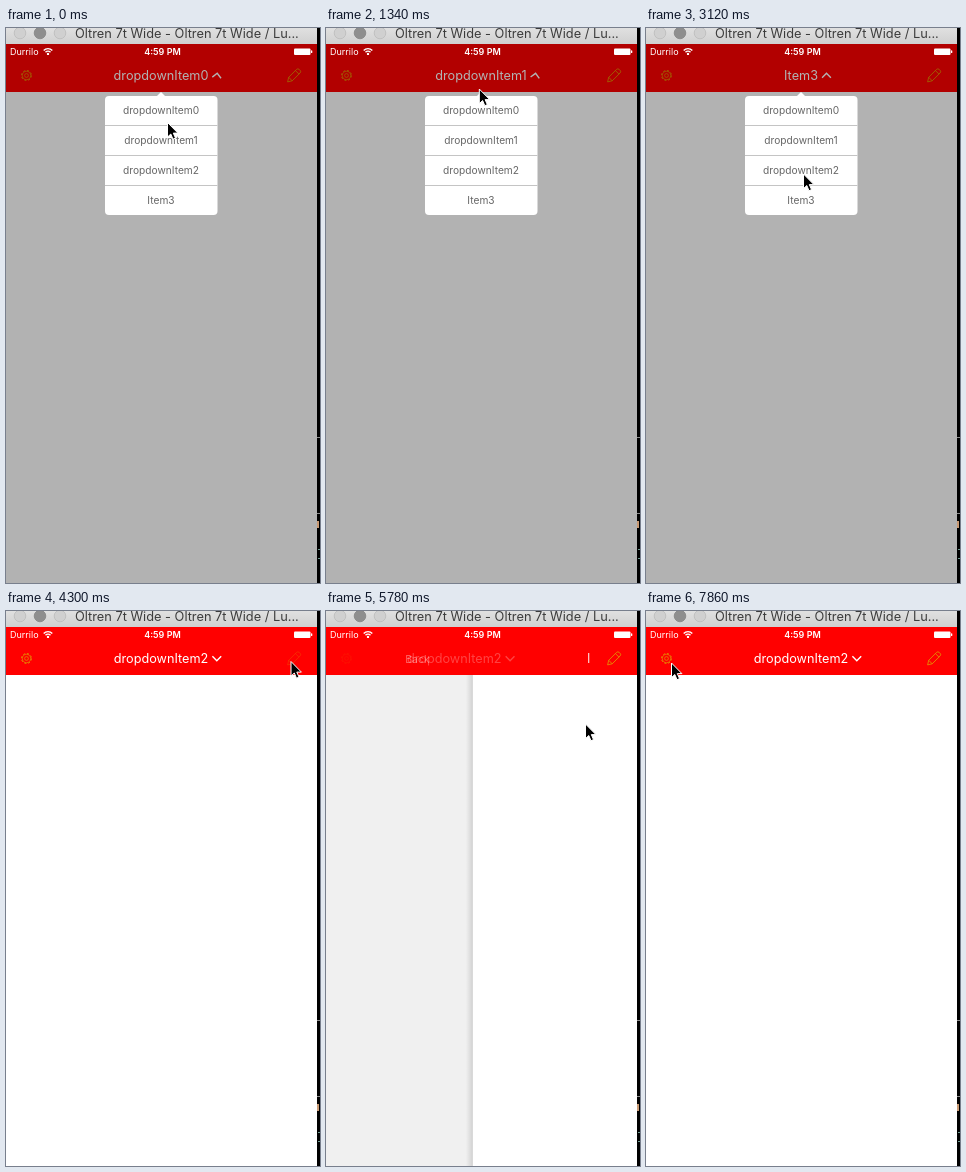
An HTML page that plays this animation: 314x555 px, repeating every 8000 ms.

```html
<!DOCTYPE html>
<html lang="en">
<head>
<meta charset="utf-8">
<title>Dropdown menu</title>
<style>
  html, body { margin: 0; width: 100%; height: 100%; overflow: hidden; background: #000; }
  svg { display: block; width: 314px; height: 555px; }
  text { font-family: Inter, Roboto, sans-serif; }
  .mid { text-anchor: middle; }
  .bar { font-size: 12.7px; fill: #fff; }
  .status { font-size: 9px; fill: #fff; }
  .item { font-size: 10.2px; fill: #666; }
  .icon { fill: none; stroke: #dfa800; stroke-width: .7; }
  .line { fill: none; stroke: #fff; stroke-width: 1.4; }
</style>
</head>
<body>
<svg viewBox="0 0 314 555">
  <defs>
    <linearGradient id="chrome" x2="0" y2="1">
      <stop stop-color="#e0e0e0"/><stop offset="1" stop-color="#d0d0d0"/>
    </linearGradient>
    <linearGradient id="shade">
      <stop stop-opacity="0"/><stop offset="1" stop-opacity=".13"/>
    </linearGradient>
    <clipPath id="screen"><rect y="16" width="311" height="539"/></clipPath>
    <clipPath id="reveal"><rect id="window" x="90" y="64" width="130"/></clipPath>
  </defs>

  <rect width="314" height="555"/>
  <path d="M311 409.5h3M311 485.5h3" stroke="#8a8a8a"/>
  <path d="M312 521.5h2M312 530.5h2" stroke="#6f9a90"/>
  <rect x="311" y="493" width="2" height="7" fill="#c99a74"/>

  <rect width="311" height="16" fill="url(#chrome)"/>
  <g stroke="#bcbcbc" fill="#d0d0d0" stroke-width=".8">
    <circle cx="14" cy="5" r="5.8"/>
    <circle cx="34" cy="5" r="5.8" fill="#8e8e8e" stroke="#858585"/>
    <circle cx="54" cy="5" r="5.8"/>
  </g>
  <text x="69" y="10" font-size="12.8" fill="#3c3c3c">Oltren 7t Wide - Oltren 7t Wide / Lu...</text>

  <g clip-path="url(#screen)">
    <rect y="16" width="311" height="539" fill="#fff"/>
    <rect id="under" y="64" width="311" height="491"/>
    <g id="page">
      <rect x="-7" y="64" width="7" height="491" fill="url(#shade)"/>
      <rect y="64" width="312" height="491" fill="#fff"/>
    </g>

    <rect y="16" width="311" height="48" fill="#f00"/>
    <g id="gear" class="icon">
      <circle cx="20.5" cy="47.5" r="5" stroke-width=".8" stroke-dasharray="2 1.927"/>
      <circle cx="20.5" cy="47.5" r="4.2" stroke-width=".6"/>
      <circle cx="20.5" cy="47.5" r="1.9" stroke-width=".6"/>
    </g>
    <path id="pencil" class="icon" transform="translate(288 47.5) rotate(-45)"
      d="M-9 0L-5-2.5H6a2 2 0 0 1 2 2v1a2 2 0 0 1-2 2H-5ZM-5-2.5V2.5M4.5-2.5V2.5"/>
    <g id="heading">
      <text id="label" class="bar mid" x="155" y="52"></text>
      <path id="caret" class="line" d="M-4.4 2.2L0-2.2L4.4 2.2"/>
    </g>
    <text id="next" class="bar mid" y="52">I</text>
    <text id="back" class="mid" y="52" font-size="10.5" fill="#fff">Back</text>
    <path id="arrow" class="line" d="M14.5 42.5L10 47.5L14.5 52.5"/>

    <rect id="dim" y="16" width="311" height="539"/>
    <g clip-path="url(#reveal)"><g id="menu">
      <path d="M150.5 68.5L155 64L159.5 68.5Z" fill="#fff"/>
      <rect x="99" y="68" width="112.5" height="119" rx="4" fill="#fff"/>
      <path d="M99 97.5H211.5M99 127.5H211.5M99 157.5H211.5" stroke="#c4c4c4"/>
    </g></g>
  </g>

  <text class="status" x="4" y="27">Durrilo</text>
  <g class="line">
    <path d="M37.7 22.4a6 6 0 0 1 8.6 0M39.5 24.2a3.5 3.5 0 0 1 5 0"/>
    <circle cx="42" cy="25.9" r=".5"/>
  </g>
  <text class="status mid" x="156.5" y="27" font-weight="600">4:59 PM</text>
  <rect x="288" y="20.5" width="16.5" height="6.5" rx="1" fill="#fff"/>
  <rect x="305" y="22.3" width="1.3" height="2.8" rx=".6" fill="#fff"/>

  <path id="cursor" d="M0 0V14.6L3.3 11.5L5.5 16.7L8 15.6L5.8 10.6H10.4Z"
    stroke="#fff" stroke-width="1" stroke-linejoin="round"/>
</svg>
<script>
const LOOP = 8000, STEPS = 54, STEP = LOOP / STEPS, LEAD = 10;
const items = ["dropdownItem0", "dropdownItem1", "dropdownItem2", "Item3"];

const $ = id => document.getElementById(id);
const set = (id, attrs) => { for (const a in attrs) $(id).setAttribute(a, attrs[a]); };
const clamp = v => Math.max(0, Math.min(1, v));
const ramp = (t, start, length) => clamp((t - start) / length);
const ease = v => v * v * (3 - 2 * v);

// Each tap opens the menu or picks an item, which closes it
const taps = [
  { time: -240, open: true, title: items[0] },
  { time: 350, open: false, title: items[1] },
  { time: 1095, open: true, title: items[1] },
  { time: 1980, open: false, title: items[3] },
  { time: 2577, open: true, title: items[3] },
  { time: 3313, open: false, title: items[2] }
];

// Pointer moves: start, end, x, y
const home = [161.5, 94.5];
const moves = [
  [0, 148, 158.5, 110],
  [300, 755, 153, 52],
  [1240, 1778, 157, 165],
  [2000, 2400, 155, 52],
  [2700, 3111, 157.5, 146],
  [3313, 4150, 285, 50.5],
  [4450, 5185, 259.5, 113],
  [5900, 6290, 24, 50],
  [6670, 7704, 46, 121],
  [7704, 7851, 25.5, 52]
];

function pointer(t) {
  let [x, y] = home;
  for (const [start, end, toX, toY] of moves) {
    const f = ease(ramp(t, start, end - start));
    x += (toX - x) * f;
    y += (toY - y) * f;
  }
  return [x, y];
}

items.forEach((name, i) => {
  const t = document.createElementNS("http://www.w3.org/2000/svg", "text");
  t.setAttribute("class", "item mid");
  t.setAttribute("x", 155);
  t.setAttribute("y", 86 + i * 30);
  t.textContent = name;
  $("menu").append(t);
});

function drawMenu(t) {
  const { time, open, title } = taps.filter(tap => tap.time <= t).pop();
  const grown = ramp(t, time, 150);
  const reveal = open ? grown : 1 - grown;
  const turn = open ? 1 - ramp(t, time, 250) : ramp(t, time + 140, 140);
  const label = $("label");
  if (label.textContent !== title) label.textContent = title;
  const caretX = 163.5 + label.getComputedTextLength() / 2;
  set("caret", { transform: `translate(${caretX} 47.5) rotate(${180 * turn})` });
  set("dim", { opacity: .3 * reveal });
  set("window", { height: 123 * reveal });
  set("menu", { transform: `translate(0 ${-4 * (1 - reveal)})` });
}

function drawPush(t) {
  const p = ease(ramp(t, 5570, 400)) - ease(ramp(t, 6310, 400));
  set("under", { opacity: .11 * p });
  set("page", { transform: `translate(${312 * (1 - p)} 0)`, opacity: p > 0 ? 1 : 0 });
  set("heading", { transform: `translate(${-50.5 * p} 0)`, opacity: clamp(1 - 1.4 * p) });
  set("gear", { opacity: clamp(1 - 1.65 * p) });
  set("next", { x: 155 + 229 * (1 - p), opacity: clamp(1.6 * p) });
  set("back", { x: 155 - 120 * p, opacity: clamp(1.4 * p - .35) });
  set("arrow", { opacity: ramp(p, .55, .45) });
}

function draw(t) {
  drawMenu(t);
  drawPush(t);
  set("pencil", { opacity: t > 4200 && t < 4500 ? .3 : 1 });
  set("cursor", { transform: `translate(${pointer(t)})` });
}

const begin = performance.now();
function tick() {
  const t = (performance.now() - begin) % LOOP;
  const step = Math.min(STEPS - 1, Math.floor((t + LEAD) / STEP));
  draw(step * STEP);
  requestAnimationFrame(tick);
}
tick();
</script>
</body>
</html>
```
